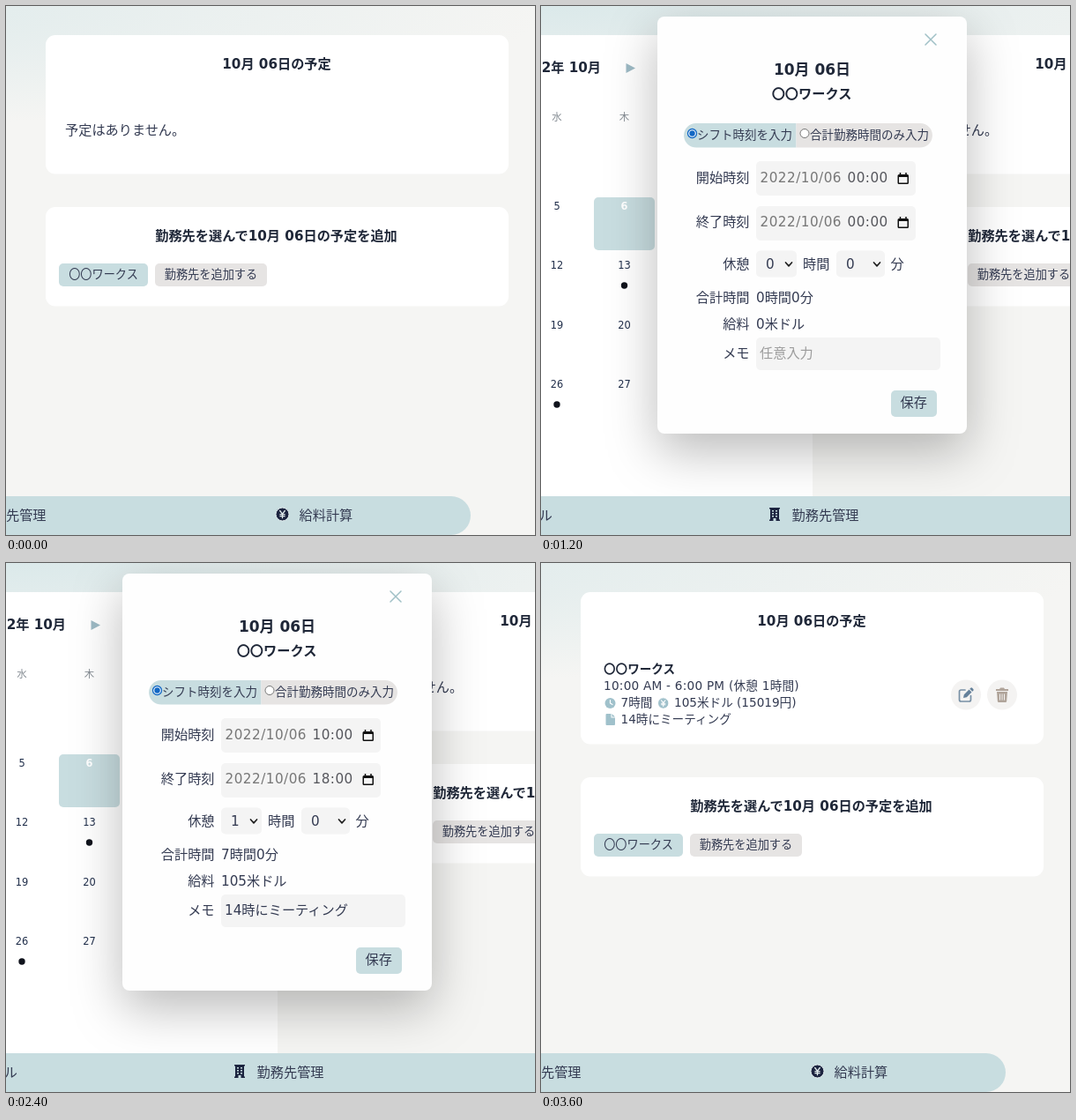
An HTML page for the animation above (4.8 s loop, 600x600 px).

```html
<!DOCTYPE html>
<html lang="ja">
<head>
<meta charset="utf-8">
<title>シフト予定</title>
<style>
  html, body { margin: 0; width: 100%; height: 100%; overflow: hidden; background: #f5f5f3; }
  svg { display: block; width: 100vw; height: 100vh; }
  text { font: 15.2px "DejaVu Sans", "Noto Sans CJK JP", "Noto Sans CJK", sans-serif; fill: #343b52; white-space: pre; }
  .b { font-weight: bold; fill: #1f2738; }
  .mid { text-anchor: middle; }
  .end { text-anchor: end; }
  .btn { font-size: 13.2px; }
  .tab { font-size: 13.5px; }
  .info { font-size: 13.6px; }
  .day { font-size: 11.4px; text-anchor: middle; fill: #22304c; }
  .week { fill: #868d94; }
  .date { letter-spacing: .5px; fill: #777; }
  .time { letter-spacing: .5px; fill: #55565c; }
  .hint { fill: #9c9c9c; }
  .card { fill: #fff; }
  .teal { fill: #c8dde0; }
  .field { fill: #f4f4f4; }
  .grey { fill: #e6e4e3; }
  .navy { fill: #1c2440; }
  .pale { fill: #a0c1cb; }
  .line { fill: none; stroke-linecap: round; stroke-linejoin: round; }
  #modal > .sheet { fill: #fefefe; filter: drop-shadow(0 20px 28px rgba(0, 0, 0, .27)); }
</style>
</head>
<body>
<svg viewBox="0 0 600 600">
  <defs>
    <radialGradient id="sky" gradientUnits="userSpaceOnUse" cx="0" cy="0" r="1"
      gradientTransform="translate(-315 0) scale(930 140)">
      <stop offset="0" stop-color="#dbe9ea"/>
      <stop offset="1" stop-color="#f5f5f3"/>
    </radialGradient>
    <g id="yen">
      <circle r="7.5"/>
      <path class="line" stroke-width="1.3" d="M-2.8-4 0-.4 2.8-4M0-.4V4.2M-2.6.2H2.6M-2.6 2.2H2.6"/>
    </g>
    <g id="picker">
      <path d="M1.500 2h9.500a1.500 1.500 0 0 1 1.500 1.500v8a1.500 1.500 0 0 1-1.500 1.500h-9.500a1.500 1.500 0 0 1-1.500-1.500v-8a1.500 1.500 0 0 1 1.500-1.500zM1.500 5v6.500h9.500v-6.500z" fill="#111" fill-rule="evenodd"/>
      <path d="M3 0v3M9.500 0v3" stroke="#111" stroke-width="1.500"/>
    </g>
    <path id="chev" class="line" d="M-3.500-2 0 1.800 3.500-2" stroke="#222" stroke-width="1.700"/>
  </defs>

  <g data-scroll>
    <rect x="-315" width="915" height="600" fill="url(#sky)"/>

    <g id="calendar" transform="translate(-315 0)">
      <rect class="card" y="33" width="308" height="523"/>
      <text class="b end" x="68" y="75">2年 10月</text>
      <path d="M96.500 65v11l10.500-5.500z" fill="#9dbac5"/>
      <rect class="teal" x="60" y="217" width="69" height="60" rx="5"/>
    </g>

    <g data-on="1110">
      <rect class="card" x="45" y="33" width="525" height="157.500" rx="11"/>
      <text x="67" y="146">予定はありません。</text>
    </g>
    <g data-on="0001">
      <rect class="card" x="45" y="33" width="525" height="172.500" rx="11"/>
      <text class="b info" x="71" y="125">〇〇ワークス</text>
      <text class="info" x="71" y="144" letter-spacing=".25">10:00 AM - 6:00 PM (休憩 1時間)</text>
      <circle class="pale" cx="78.500" cy="159" r="6"/>
      <path class="line" d="M78.500 155.500v3.500l2.500 1.500" stroke="#fff" stroke-width="1.200"/>
      <text class="info" x="90.500" y="163">7時間</text>
      <use href="#yen" class="pale" stroke="#fff" transform="translate(138.700 159) scale(.82)"/>
      <text class="info" x="151" y="163">105米ドル (15019円)</text>
      <path class="pale" d="M74.500 171h5v4.500h4.500v7.500a1 1 0 0 1-1 1h-8.500a1 1 0 0 1-1-1v-11a1 1 0 0 1 1-1zM80.500 171l3.500 3.500h-3.500z"/>
      <text class="info" x="90.500" y="182">14時にミーティング</text>

      <g fill="#f4f3f2"><circle cx="482" cy="149.500" r="17"/><circle cx="523" cy="149.500" r="17"/></g>
      <path class="line" d="M481 144h-4.500a2 2 0 0 0-2 2v9a2 2 0 0 0 2 2h9a2 2 0 0 0 2-2v-4.500" stroke="#7890a5" stroke-width="1.700"/>
      <path d="M479 153l.8-3.700 5.700-5.700 3 3-5.700 5.700zM486.300 142.800l1-1a1.300 1.300 0 0 1 1.800 0l1.200 1.200a1.300 1.300 0 0 1 0 1.800l-1 1z" fill="#64809a"/>
      <path d="M516 143h4l1-1.500h4l1 1.500h4v2h-14zM517 146h12l-.8 10.500a1.500 1.500 0 0 1-1.500 1.500h-7.400a1.500 1.500 0 0 1-1.500-1.500z" fill="#b0a49a"/>
      <path d="M520.500 148.500v7M523 148.500v7M525.500 148.500v7" stroke="#f4f3f2"/>
    </g>
    <text class="b mid" x="307" y="71">10月 06日の予定</text>

    <g id="add">
      <rect class="card" x="45" y="228" width="525" height="112.500" rx="11"/>
      <text class="b mid" x="306.500" y="266">勤務先を選んで10月 06日の予定を追加</text>
      <rect class="teal" x="60" y="292" width="101" height="26" rx="5"/>
      <text class="btn mid" x="110.500" y="309">〇〇ワークス</text>
      <rect class="grey" x="169" y="292" width="127" height="26" rx="5"/>
      <text class="btn mid" x="232.500" y="309">勤務先を追加する</text>
    </g>
  </g>

  <g id="modal" data-on="0110">
    <rect class="sheet" x="132" y="12" width="351" height="473" rx="8"/>
    <path class="line" d="M436 32l12 12M448 32l-12 12" stroke="#a0c0c6" stroke-width="1.500"/>
    <text class="b mid" x="307.500" y="77.500" style="font-size:17px">10月 06日</text>
    <text class="b mid" x="307" y="105">〇〇ワークス</text>

    <path class="teal" d="M289.500 133v27.500h-113.700a13.750 13.750 0 0 1 0-27.500z"/>
    <path class="grey" d="M289.500 133v27.500h140.700a13.750 13.750 0 0 0 0-27.500z"/>
    <circle cx="171.500" cy="144.500" r="5" fill="#fff" stroke="#1268c4" stroke-width="1.300"/>
    <circle cx="171.500" cy="144.500" r="3.200" fill="#1268c4"/>
    <circle cx="299" cy="144.500" r="5" fill="#fff" stroke="#767676"/>
    <text class="tab" x="177" y="151">シフト時刻を入力</text>
    <text class="tab" x="305" y="151">合計勤務時間のみ入力</text>

    <g class="field">
      <rect x="244" y="176" width="181" height="39" rx="5"/>
      <rect x="244" y="227" width="181" height="39" rx="5"/>
      <rect x="244" y="277.500" width="46" height="30" rx="5"/>
      <rect x="335" y="277.500" width="55" height="30" rx="5"/>
      <rect x="244" y="376" width="209" height="37" rx="5"/>
    </g>
    <g id="labels"></g>
    <text class="date" x="248.500" y="200">2022/10/06</text>
    <text class="date" x="248.500" y="250">2022/10/06</text>
    <use href="#picker" x="404.500" y="189"/>
    <use href="#picker" x="404.500" y="239"/>
    <use href="#chev" x="281" y="293"/>
    <use href="#chev" x="381" y="293"/>
    <text x="297" y="298">時間</text>
    <text x="346" y="298">0</text>
    <text x="396.500" y="298">分</text>
    <rect class="teal" x="397" y="436" width="52" height="30" rx="5"/>
    <text class="mid" x="422.800" y="454.500">保存</text>
    <g id="blank" data-on="0100"></g>
    <g id="filled" data-on="0010"></g>
  </g>

  <g data-scroll>
    <rect class="teal" x="-400" y="556" width="927" height="44" rx="22"/>
    <text class="end" x="-302" y="583">スケジュール</text>
    <path class="navy" fill-rule="evenodd" d="M-56 569h12v1.500h-1v12h1v1.500h-4.500v-3h-3v3h-4.500v-1.500h1v-12h-1zM-53 572v1.500h2v-1.500zM-49 572v1.500h2v-1.500zM-53 575v1.500h2v-1.500zM-49 575v1.500h2v-1.500zM-53 578v1.500h2v-1.500zM-49 578v1.500h2v-1.500z"/>
    <text class="end" x="45.500" y="583">勤務先管理</text>
    <use href="#yen" class="navy" stroke="#e4eeef" transform="translate(313.500 576.500)"/>
    <text x="332.500" y="583">給料計算</text>
  </g>
</svg>
<script>
const LOOP = 4800;
const $ = id => document.getElementById(id);
const $$ = css => document.querySelectorAll(css);

function add(parent, tag, attrs, text = '') {
  const el = document.createElementNS('http://www.w3.org/2000/svg', tag);
  for (const key in attrs) el.setAttribute(key, attrs[key]);
  el.textContent = text;
  parent.append(el);
}
const write = (parent, x, y, text, cls = '') => add(parent, 'text', { x, y, class: cls }, text);

// Calendar
const cal = $('calendar');
const columns = [18, 94.5];
['水', '木'].forEach((day, i) => write(cal, columns[i], 129.5, day, 'day week'));
for (let row = 0; row < 4; row++) {
  columns.forEach((x, i) => {
    const day = 5 + row * 7 + i;
    write(cal, x, 231 + row * 67.4, day, 'day' + (day === 6 ? ' b' : ''));
    if (day === 6) cal.lastChild.style.fill = '#fff';
  });
}
for (const [cx, cy] of [[94.5, 317], [18, 452]]) add(cal, 'circle', { cx, cy, r: 3.7, fill: '#10131c' });

// Form
const labels = { 開始時刻: 200, 終了時刻: 250, 休憩: 298, 合計時間: 335.5, 給料: 365.5, メモ: 399 };
for (const name in labels) write($('labels'), 236.5, labels[name], name, 'end');

function fill(id, from, to, rest, total, pay, memo, memoClass) {
  const g = $(id);
  write(g, 347.5, 200, from, 'time');
  write(g, 347.5, 250, to, 'time');
  write(g, 255, 298, rest);
  write(g, 244, 335.5, total);
  write(g, 244, 365.5, pay);
  write(g, 248, 399, memo, memoClass);
}
fill('blank', '00:00', '00:00', '0', '0時間0分', '0米ドル', '任意入力', 'hint');
fill('filled', '10:00', '18:00', '1', '7時間0分', '105米ドル', '14時にミーティング');

// One value per quarter of the loop, held until the next
function hold(el, prop, values) {
  const steps = values.map((v, i) => ({ [prop]: v, offset: i / values.length, easing: 'step-end' }));
  steps.push({ [prop]: values[values.length - 1], offset: 1 });
  el.animate(steps, { duration: LOOP, iterations: Infinity });
}
$$('[data-on]').forEach(el => hold(el, 'opacity', [...el.dataset.on].map(Number)));
$$('[data-scroll]').forEach(el => hold(el, 'transform', [0, 315, 315, 0].map(x => `translate(${x}px, 0px)`)));
hold($('add'), 'transform', [0, 0, 0, 15].map(y => `translate(0px, ${y}px)`));
</script>
</body>
</html>
```
